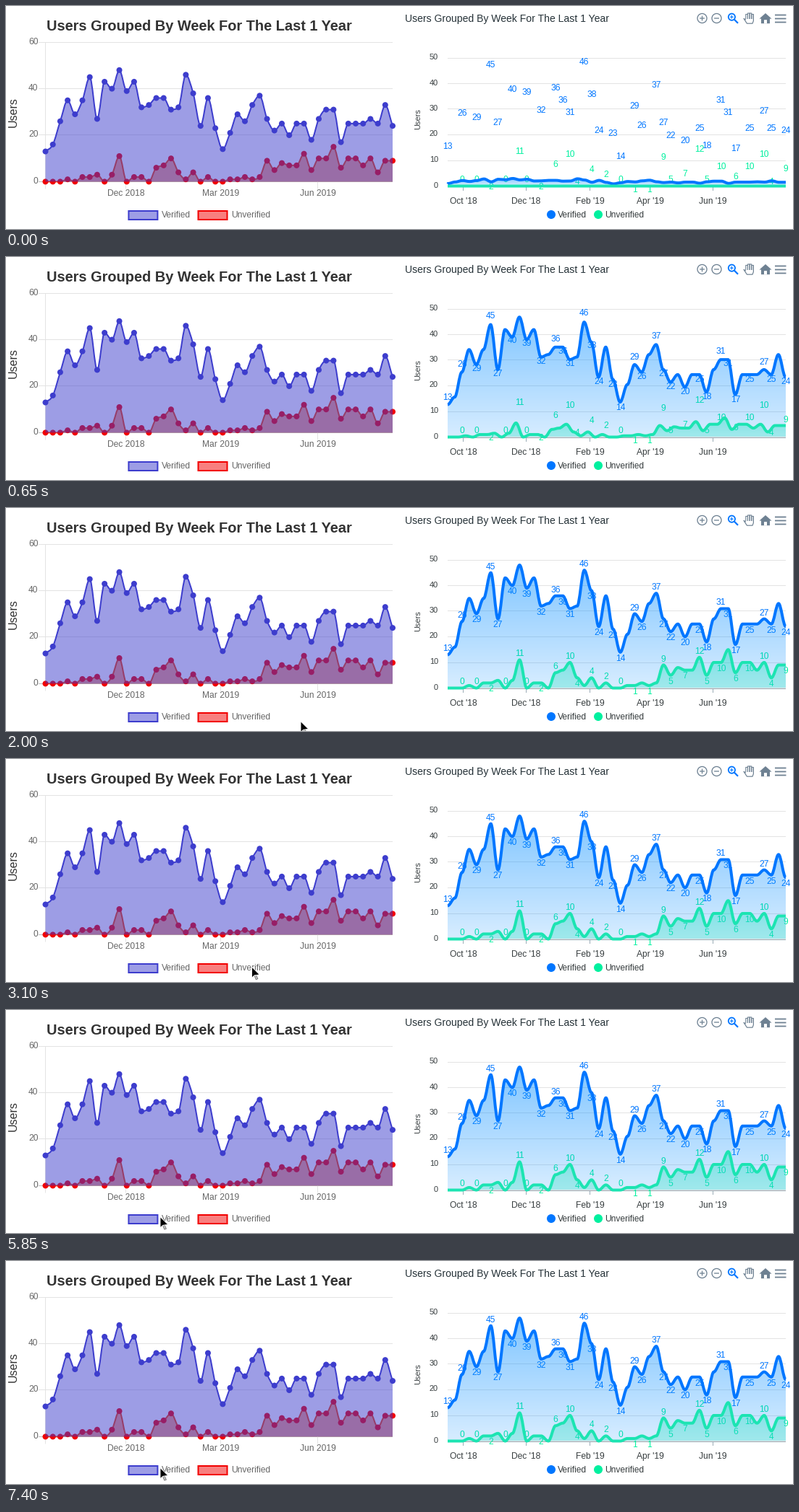
A matplotlib script for the animation above (8000 ms loop, 1087 px wide and 309 px high).

```python
from itertools import count

import matplotlib.pyplot as plt
import numpy as np
from matplotlib.animation import FuncAnimation
from matplotlib.colors import to_rgb
from matplotlib.patches import Circle, PathPatch, Polygon, Rectangle
from matplotlib.path import Path

W, H = 1087, 309
STEP, LOOP = 50, 8000
PX = 0.72  # points per pixel at 100 dpi

# weekly sign-ups, the chart's data
VERIFIED = np.array([
    13, 16, 26, 35, 29, 35, 45, 27, 43, 40, 48, 39, 43, 32, 33, 36,
    36, 31, 32, 46, 38, 24, 36, 23, 14, 21, 29, 26, 33, 37, 27, 22,
    25, 20, 25, 25, 18, 27, 31, 31, 17, 25, 25, 25, 27, 25, 33, 24])
UNVERIFIED = np.array([
    0, 0, 0, 1, 0, 2, 2, 3, 0, 3, 11, 0, 2, 2, 0, 6,
    7, 10, 4, 1, 4, 0, 2, 0, 0, 1, 1, 2, 1, 2, 9, 5,
    8, 7, 7, 12, 5, 10, 10, 15, 6, 10, 10, 7, 10, 4, 9, 9])
WEEKS = len(VERIFIED)

INDIGO, RED, EMBER = "#3d3dcd", "#f20000", "#f03f05"
BLUE, SKY = "#0076ff", "#008cff"
GREEN, TEAL, AQUA = "#00f09f", "#1ce4b2", "#22e0c0"
GREY, INK, ICON = "#666666", "#373d3f", "#6e8192"
GRID, AXIS = "#e3e3e3", "#9aabb5"
TITLE = "Users Grouped By Week For The Last 1 Year"

plt.rcParams["font.family"] = "Liberation Sans"
fig = plt.figure(figsize=(W / 100, H / 100), dpi=100, facecolor="white")
ax = fig.add_axes([0, 0, 1, 1])
ax.set_xlim(0, W)
ax.set_ylim(H, 0)
ax.axis("off")
layer = count(1)


def text(x, y, s, size=12, color=GREY, ha="center", **kw):
    kw.setdefault("va", "baseline")
    return ax.text(x, y, s, fontsize=size * PX, color=color, ha=ha,
                   zorder=next(layer), **kw)


def line(xs, ys, color, width=1):
    return ax.plot(xs, ys, color=color, lw=width * PX, zorder=next(layer),
                   solid_capstyle="butt", snap=False)[0]


def add(patch, width=0):
    patch.set(linewidth=width * PX, zorder=next(layer), snap=False)
    return ax.add_patch(patch)


def row(y):
    """Centre of the pixel row nearest to y."""
    return np.round(y - 0.5) + 0.5


def curve(x, y, slope, k, base=None):
    """Bezier path through the points; closed down to base if given."""
    p = np.column_stack([x, y])
    t = np.column_stack([np.ones(len(x)), slope])
    reach = k * np.diff(x)[:, None]
    segs = np.stack([p[:-1] + reach * t[:-1], p[1:] - reach * t[1:], p[1:]], 1)
    verts = np.vstack([p[:1], segs.reshape(-1, 2)])
    codes = [Path.MOVETO] + [Path.CURVE4] * (len(verts) - 1)
    if base is not None:
        verts = np.vstack([verts, [[x[-1], base], [x[0], base], [x[0], base]]])
        codes += [Path.LINETO, Path.LINETO, Path.CLOSEPOLY]
    return Path(verts, codes)


def monotone(x, y):
    """Fritsch-Carlson tangents."""
    d = np.diff(y) / np.diff(x)
    m = np.r_[d[0], (d[:-1] + d[1:]) / 2, d[-1]]
    m[1:-1][d[:-1] * d[1:] <= 0] = 0
    for i, di in enumerate(d):
        if di == 0:
            m[i:i + 2] = 0
            continue
        r = np.hypot(m[i], m[i + 1]) / abs(di)
        if r > 3:
            m[i:i + 2] *= 3 / r
    return m


# ---- left chart ----
L0, L1, LT, LB = 54.5, 534, 50.2, 243.4
lx = np.linspace(L0, L1, WEEKS)
levels = [LB + (LT - LB) * f / 3 for f in range(4)]

text(267, 34, TITLE, 20, "#333333", weight="bold")
text(10, 147, "Users", 16, "#333333", rotation=90, va="center")
for y in levels:
    line([45, L1], [row(y)] * 2, "#bfbfbf" if y == LB else GRID)
line([L0, L0], [LT, LB + 10], GRID)
for x, s in ((165.5, "Dec 2018"), (296.5, "Mar 2019"), (430.5, "Jun 2019")):
    line([x, x], [LB, LB + 10], GRID)
    text(x, 263, s)


def ticks(top):
    return [text(44.5, row(y) + 2.5, str(top * f // 3), ha="right")
            for f, y in enumerate(levels)]


def series(data, color, dots, top):
    y = LB + (LT - LB) * data / top
    m = monotone(lx, y)
    rings = Path.make_compound_path(*[Path.circle(c, 4) for c in zip(lx, y)])
    return [
        add(PathPatch(curve(lx, y, m, 1 / 3, LB), fc=color, ec="none", alpha=0.5)),
        add(PathPatch(curve(lx, y, m, 1 / 3), fc="none", ec=color), 2),
        add(PathPatch(rings, fc=dots, ec="none")),
    ]


def legend(x, color, s, end):
    add(Rectangle((x, 284), 40, 12, fc=color, ec="none", alpha=0.5))
    add(Rectangle((x, 284), 40, 12, fc="none", ec=color, joinstyle="miter"), 2)
    text(x + 46, 293, s, ha="left")
    return [line([x + 46, end], [289.5, 289.5], GREY, 1.6)]


ticks60, ticks15 = ticks(60), ticks(15)
red60 = series(UNVERIFIED, EMBER, RED, 60)
red15 = series(UNVERIFIED, RED, RED, 15)
indigo = series(VERIFIED, INDIGO, INDIGO, 60)
strike_v = legend(169.4, INDIGO, "Verified", 256)
strike_u = legend(265.5, RED, "Unverified", 366)


# ---- right chart ----
R0, R1, RB, UNIT = 610, 1077, 249.5, 3.55
rx = np.linspace(R0, R1, WEEKS)
GAP = rx[1] - rx[0]

text(551, 22, TITLE, 14, "#263238", "left")
text(569, 157, "Users", 11, INK, rotation=90, va="center")
for v in range(0, 60, 10):
    y = RB - UNIT * v
    line([R0, R1], [row(y)] * 2, GRID)
    text(597, y + 2, str(v), 11, INK, "right")
line([R0, R1], [250.5, 250.5], AXIS)
for x, s in ((631.5, "Oct '18"), (718.5, "Dec '18"), (806.5, "Feb '19"),
             (889.5, "Apr '19"), (976.5, "Jun '19")):
    line([x, x], [250, 256], AXIS)
    text(x, 274, s, 12, INK)
for x, color, s in ((753, BLUE, "Verified"), (818, GREEN, "Unverified")):
    add(Circle((x, 289), 6, fc=color, ec="none"))
    text(x + 9, 293, s, 12, INK, "left")


def labels(data, color):
    """Above rising points, below others; skipped unless clear of the last one."""
    last = (-99, -99)
    for i, v in enumerate(data):
        above = i == 0 or v == 0 or v > data[i - 1]
        x, y = rx[i], RB - UNIT * v + (-9 if above else 7.8)
        if x <= last[0] + 15 and y <= last[1] + 15:
            continue
        last = (x, y)
        if i or v:
            text(x, y + 4, str(v), 12, color)


labels(VERIFIED, BLUE)
labels(UNVERIFIED, GREEN)


class Area:
    def __init__(self, data, stroke, fill, top, bottom):
        self.data = data
        ramp = np.ones((256, 1, 4))
        ramp[..., :3] = to_rgb(fill)
        ramp[:, 0, 3] = np.linspace(top, bottom, 256)
        self.fill = ax.imshow(ramp, extent=(R0, R1, RB, 0), aspect="auto",
                              interpolation="nearest", zorder=next(layer))
        self.edge = add(PathPatch(curve(rx, data, 0 * rx, 0.35), fc="none",
                                  ec=stroke, capstyle="butt"), 4)

    def grow(self, s):
        # points rise from the zero line and slide in from one week earlier
        x = np.r_[np.maximum(rx - GAP * (1 - s), R0), R1]
        y = RB - UNIT * s * np.r_[self.data, self.data[-1]]
        self.fill.set_extent((R0, R1, RB, min(y.min(), RB - 2)))
        self.fill.set_clip_path(curve(x, y, 0 * x, 0.35, RB), ax.transData)
        self.edge.set_path(curve(x, y, 0 * x, 0.35))


verified = Area(VERIFIED, BLUE, SKY, 0.5, 0.16)
unverified = Area(UNVERIFIED, TEAL, AQUA, 0.42, 0.3)
ax.set_xlim(0, W)
ax.set_ylim(H, 0)

# ---- toolbar ----
for x in (961.5, 981.5):
    add(Circle((x, 17), 6.5, fc="none", ec=ICON), 1.3)
    line([x - 3.4, x + 3.4], [17, 17], ICON, 1.3)
line([961.5, 961.5], [13.6, 20.4], ICON, 1.3)

add(Circle((1002.4, 15.2), 4.6, fc="none", ec=BLUE), 1.8)
line([1005.8, 1011], [18.6, 23.8], BLUE, 2.2)
line([1000, 1004.8], [15.2, 15.2], BLUE, 1.1)
line([1002.4, 1002.4], [12.8, 17.6], BLUE, 1.1)

line([1021.8, 1019, 1023.4, 1031, 1032.4, 1032.4],
     [19, 17.4, 24.2, 24.2, 20.5, 12], ICON, 1.2)
for i, top in enumerate((11.5, 10, 10, 11.5)):
    x = 1021.8 + 2.65 * i
    line([x, x, x + 2.65, x + 2.65], [18, top, top, 18], ICON, 1.1)

add(Polygon([(1040.5, 17.6), (1049, 10), (1057.5, 17.6)], fc=ICON, ec="none"))
add(Rectangle((1043, 16.5), 12, 7.7, fc=ICON, ec="none"))
add(Rectangle((1047, 19.2), 4, 5, fc="white", ec="none"))
for y in (12.5, 17.5, 22.5):
    line([1062, 1077.5], [y, y], ICON, 1.8)

# ---- pointer ----
TAIL = np.array([(3.4, 11.8), (5.8, 17.6), (8.4, 16.6), (5.8, 10.8)])
HEAD = np.array([(0, 0), (0, 15.2), (3.6, 11.8), (10.8, 10.8)])
pointer = [
    (add(Polygon(TAIL, fc="#c4c4c4", ec="#707070"), 0.8), TAIL),
    (add(Polygon(HEAD, fc="black", ec="white"), 0.9), HEAD),
]

# (start, end, from, to); it leaves through the bottom edge
MOVES = [
    (2000, 2600, (407, 295.5), (339.5, 312)),
    (2850, 3100, (339.5, 306), (339.5, 288)),
    (5200, 5400, (339.5, 288), (287, 312)),
    (5650, 5850, (213, 306), (213, 286.5)),
]


def tip(t):
    at = np.array([0, H + 9])
    for a, b, p, q in MOVES:
        if t >= a:
            at = np.array(p) + np.subtract(q, p) * min((t - a) / (b - a), 1)
    return at


def ease(u):
    return 0.5 - 0.5 * np.cos(np.pi * np.clip(u, 0, 1))


def show(artists, on):
    for a in artists:
        a.set_visible(on)


def draw(n):
    t = n * STEP
    # the opening growth stalls briefly
    verified.grow(ease((min(t, 150) + 128 if t < 300 else t + 70) / 800))
    unverified.grow(ease((t - 250) / 800 if t >= 300 else 0))

    no_u, no_v = 3750 <= t < 4900, 6500 <= t < 7400
    show(indigo + ticks60, not no_v)
    show(red60, not (no_u or no_v))
    show(red15 + ticks15 + strike_v, no_v)
    show(strike_u, no_u)

    at = tip(t)
    for patch, shape in pointer:
        patch.set_xy(shape + at)
        patch.set_visible(at[1] < H)
    return []


anim = FuncAnimation(fig, draw, frames=LOOP // STEP, interval=STEP,
                     repeat=True, repeat_delay=0, blit=False)
plt.show()
```
